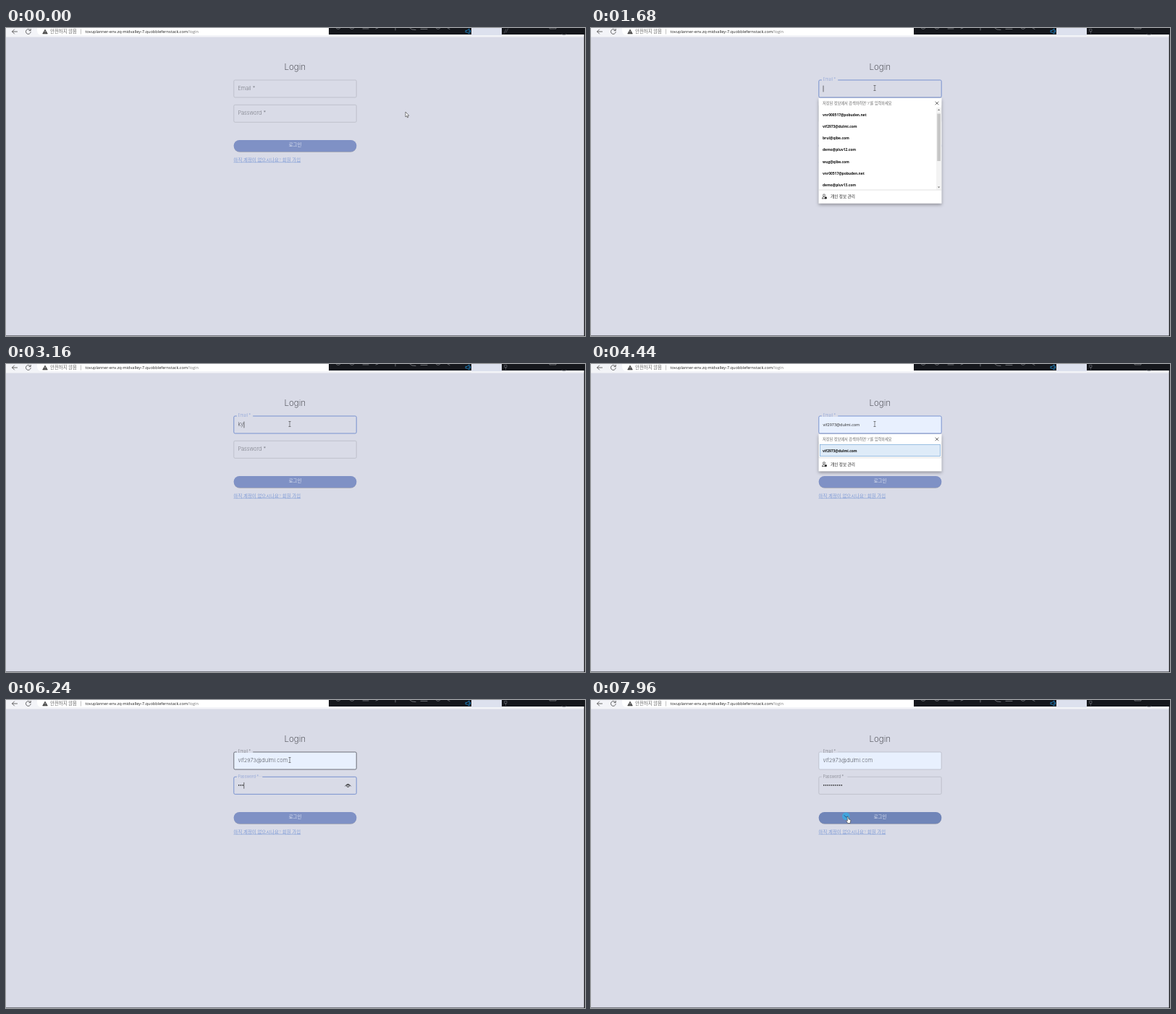
An HTML page that plays this animation: 800x426 px, repeating every 8 s.

```html
<!DOCTYPE html>
<html lang="ko">
<head>
<meta charset="utf-8">
<title>Login</title>
<style>
  html, body { margin: 0; width: 100%; height: 100%; overflow: hidden; background: #d9dbe7; }
  svg { display: block; width: 800px; height: 426px; }
  text { white-space: pre; }
  .page { font-family: Inter, "Noto Sans CJK KR", sans-serif; font-weight: 200; }
  .ui { font-family: "Open Sans", "Noto Sans CJK KR", sans-serif; }
  .line { fill: none; stroke-linecap: round; stroke-linejoin: round; }
</style>
</head>
<body>
<svg viewBox="0 0 800 426">
  <rect width="800" height="426" fill="#d9dbe7"/>
  <rect width="800" height="12.5" fill="#f3f4f8"/>
  <path d="M43 0H446V10H49Q43 10 43 3Z" fill="#fff"/>
  <g class="line" stroke="#444" stroke-width=".8">
    <path d="M15.5 5H8.5M11.5 2L8.5 5L11.5 8"/>
    <path d="M33.6 3A3.4 3.4 0 1 0 34.2 5.6M34.2 1.4V3.6H32"/>
  </g>
  <path d="M54 2L57.4 8H50.6Z" fill="#444" stroke="#444" stroke-linejoin="round" stroke-width=".6"/>
  <path d="M54 4V5.8M54 6.6V7.3" stroke="#fff" stroke-width=".7"/>
  <path d="M103.5 1.5V8.5" stroke="#999" stroke-width=".6"/>
  <g class="ui">
    <text x="61" y="7.3" font-size="6.4" fill="#666">안전하지 않음</text>
    <text x="109.5" y="7.2" font-size="5.6" fill="#222">tovuplanner-env.zq-midvalley-7.quobblefernstack.com<tspan fill="#777">/login</tspan></text>
  </g>
  <path d="M446 0H643V9H446ZM685 0H800V9H685Z" fill="#15171c"/>
  <rect x="643" width="42" height="10" fill="#dde1ee"/>
  <g class="line" stroke="#909299" stroke-width=".7">
    <path d="M456 0Q459 3 462 0M475 0Q478 3 481 0M493 1H501M511 1L514 0M538 0V3M558 0L561 2L566 2.5M573 1.5H582M594 0Q597 3 600 0M610 0L613 1.5M751 0V1H760V0M768 9Q771 11 774 9"/>
  </g>
  <path d="M635 3.5H637L640 1V8L637 5.8H635ZM641.5 3V6" fill="none" stroke="#1c8fd6" stroke-width=".8"/>

  <text class="page" x="399.3" y="58.2" font-size="11.6" text-anchor="middle" fill="#2c2d33">Login</text>
  <g id="scene"></g>
  <path d="M798.7 9H800V426H798.7ZM0 425H800V425.6H0Z" fill="#17181c"/>
</svg>
<script>
const scene = document.getElementById('scene');
const ruler = document.createElement('canvas').getContext('2d');
ruler.font = '200 7.5px Inter, sans-serif';

const PAGE = '#d9dbe7', BLUE = '#6684c9', GREY = '#b4b6c1';
const ACCOUNT = 'vif2973@dulmi.com';
const ACCOUNTS = ['vnr000517@pobuden.net', ACCOUNT, 'brul@qibe.com', 'demo@pluv12.com',
  'wug@qibe.com', 'vnr00517@pobuden.net', 'demo@pluv13.com'];

const EMAIL_FOCUS = 580, FIRST_KEY = 1760, SUGGEST = 3760, PREVIEW = 4440, ACCEPT = 4680;
const PASSWORD_FOCUS = 5125, LEAVE = 7320, CLICK = 7880;
const TYPED = [[0, ''], [FIRST_KEY, 'k'], [2240, 'kj'], [2520, ''], [2720, 'k'], [2920, 'ky'], [3040, 'kyc'],
  [3160, 'ky'], [3320, 'k'], [3560, ''], [SUGGEST, 'v'], [3920, 'vi'], [PREVIEW, ACCOUNT]];
const KEYSTROKES = [5560, 5800, 6240, 6280, 6320, 6560, 6800, 6860, 6920, 7120];
const MOUSE = [[0, 552, 116], [40, 552, 116], [160, 534, 111], [520, 400, 84], [600, 388, 79], [840, 384, 77],
  [920, 392, 83], [7280, 392, 83], [7360, 343.5, 103], [7560, 338, 138], [7760, 349, 158], [7920, 354, 163], [8000, 354, 163]];

const clamp = v => Math.max(0, Math.min(1, v));
const mix = (a, b, p) => a + (b - a) * p;
const text = (x, y, size, fill, str, extra = 'class="ui"') =>
  `<text x="${x}" y="${y}" font-size="${size}" fill="${fill}" ${extra}>${str}</text>`;
const box = (x, y, w, h, extra) => `<rect x="${x}" y="${y}" width="${w}" height="${h}" ${extra}/>`;
const line = (d, stroke, width = .8) => `<path class="line" d="${d}" stroke="${stroke}" stroke-width="${width}"/>`;

function mouseAt(t) {
  const i = Math.max(1, MOUSE.findIndex(k => k[0] >= t));
  const [a, b] = [MOUSE[i - 1], MOUSE[i]];
  const p = (t - a[0]) / (b[0] - a[0]);
  return [mix(a[1], b[1], p), mix(a[2], b[2], p)];
}

// Outlined input whose label floats into a notch in the top border.
function field(y, name, notch, t, start, focused, hovered, fill) {
  const x = clamp((t - start) / 200), p = 1 - (1 - x) ** 2;
  const border = focused ? BLUE : hovered ? '#3a3b42' : GREY;
  return box(314.8, y, 169.4, 24, `rx="1.7" fill="${fill}" stroke="${border}" stroke-width="${focused ? .85 : .7}"`)
    + (p ? line(`M319.5 ${y}h${notch * p}`, PAGE, 1.8) : '')
    + text(320.5, mix(y + 13.7, y + 1.2, p), mix(7.4, 5.5, p), focused ? '#6f8cd0' : '#55575f', name + ' *', 'class="page"');
}

function caret(x, y, since, t) {
  return Math.floor((t - since) / 540) % 2 ? '' : line(`M${x} ${y - 4}v8`, '#333', .7);
}

function dropdown(items, selected) {
  const bottom = items.length > 3 ? 242.7 : 132.1 + 16.3 * items.length;
  const rule = bottom - 18.7, foot = bottom - 9.3;
  let out = box(314.5, 97, 170, bottom - 97, 'fill="#fff" style="filter:drop-shadow(0 2px 2px #0005)"')
    + text(320, 106, 5.2, '#666', "저장된 정보에서 검색하려면 '/'를 입력하세요")
    + line('M476 102l4 4m0-4l-4 4', '#333', .7);
  if (selected) out += box(316.5, 111.5, 166, 16, 'fill="#deebf8" stroke="#78a9d8" stroke-width=".7"');
  items.forEach((item, i) => out += text(320, 121.5 + 16.3 * i, 4.9, '#111', item, 'class="ui" font-weight="700"'));
  if (items.length > 3) {
    out += box(477, 110, 7, 113.5, 'fill="#f3f3f3"') + box(478.3, 118.5, 4.6, 65.5, 'fill="#c6c6c6"')
      + '<path d="M478.9 114l1.7-1.8 1.7 1.8zM478.9 219.5l1.7 1.8 1.7-1.8z" fill="#777"/>';
  }
  return out + line(`M314.8 ${rule}h169.4`, '#d5d5d5', .7)
    + `<circle cx="322" cy="${foot - 2}" r="1.5" fill="none" stroke="#333" stroke-width=".7"/>`
    + line(`M319.5 ${foot + 2.5}q0-3 2.5-3M319.5 ${foot + 2.5}h3`, '#333', .7)
    + `<circle cx="324.3" cy="${foot + 1.5}" r="1.7" fill="#222"/>`
    + text(331, foot + 2, 5.6, '#222', '개인 정보 관리');
}

function pointer(x, y, kind) {
  const at = `transform="translate(${x} ${y})"`;
  if (kind === 'beam') return `<g ${at}>${line('M-1.2-3.5H1.2M0-3.5V3.5M-1.2 3.5H1.2', '#444', .6)}</g>`;
  const d = kind === 'hand'
    ? 'M0-1Q1-2 1.6-.8L2 2L4.5 2.5Q5 3 4.7 5L4 7.5H.8L-1.3 4.3Q-1 3.3.4 4.2Z'
    : 'M0 0V7L1.6 5.6L2.7 8L3.8 7.5L2.7 5.2H4.8Z';
  return `<path ${at} d="${d}" fill="#fff" stroke="#333" stroke-width=".6" stroke-linejoin="round"/>`;
}

function draw(t) {
  const [mx, my] = mouseAt(t);
  const inside = (top, bottom) => mx > 314 && mx < 485 && my > top && my < bottom;
  const onEmail = inside(72, 96), onPassword = inside(106, 130), onButton = inside(155, 171);
  const emailFocus = t >= EMAIL_FOCUS && t < PASSWORD_FOCUS;
  const passwordFocus = t >= PASSWORD_FOCUS && t < CLICK;
  const [edited, value] = TYPED.filter(k => k[0] <= t).pop();
  const dots = KEYSTROKES.filter(k => k <= t).length;

  let out = line(t < 640 ? 'M688.5 7l2-5M691 6l2.5-5' : 'M689 1.5h3v3h-3zM690.5 4.5v3', '#73757c', .6)
    + field(72, 'Email', 21, t, EMAIL_FOCUS, emailFocus, onEmail && t < LEAVE, t >= PREVIEW ? '#e8f0fe' : 'none')
    + field(106.3, 'Password', 34, t, PASSWORD_FOCUS, passwordFocus, onPassword, 'none');

  const preview = t >= PREVIEW && t < ACCEPT;
  out += preview ? text(320.5, 85.8, 5.5, '#222', value)
    : text(320.5, 86.3, 7.5, '#222329', value, 'class="page"');
  if (emailFocus && !preview) {
    const since = t >= ACCEPT ? ACCEPT : Math.max(edited, EMAIL_FOCUS);
    out += caret(321 + ruler.measureText(value).width, 84, since, t);
  }

  if (dots) out += `<path class="line" d="M321.8 117.8h${2.72 * (dots - 1) + .01}" stroke="#222" stroke-width="1.7" stroke-dasharray="0 2.72"/>`;
  if (passwordFocus) {
    out += caret(320.7 + 2.7 * dots, 118.3, dots ? KEYSTROKES[dots - 1] : PASSWORD_FOCUS, t);
    if (dots) out += line('M468.7 119Q472.5 113.5 476.3 119', '#222', .9)
      + '<circle cx="472.5" cy="118.8" r="1.6" fill="none" stroke="#222" stroke-width=".9"/>';
  }

  out += box(315, 155.6, 169, 16.2, 'rx="8.1" fill="#9c9fae"')
    + box(314.6, 155, 169.8, 16, `rx="8" fill="${onButton ? '#7085b8' : '#7f91c5'}"`)
    + text(399.5, 164.3, 6.3, '#e3e7f4', '로그인', 'class="page" text-anchor="middle"')
    + text(314.5, 184.5, 6.4, '#7f9bd6', '아직 계정이 없으시나요? 회원 가입',
      'class="page" style="text-decoration:underline .5px"');

  if (t >= 640 && t < FIRST_KEY) out += dropdown(ACCOUNTS);
  if (t >= SUGGEST && t < ACCEPT) out += dropdown(ACCOUNTS.filter(a => a.startsWith(value)), preview);

  if (t >= CLICK) out += '<circle cx="352.3" cy="160.8" r="5.3" fill="#42a5dc"/>'
    + line('M350 159.5l2 2.5 3-1', '#2a5f91', 1);
  scene.innerHTML = out + pointer(mx, my, onEmail || onPassword ? 'beam' : onButton ? 'hand' : 'arrow');
}

function tick() {
  draw(performance.now() % 8000);
  requestAnimationFrame(tick);
}
tick();
</script>
</body>
</html>
```
